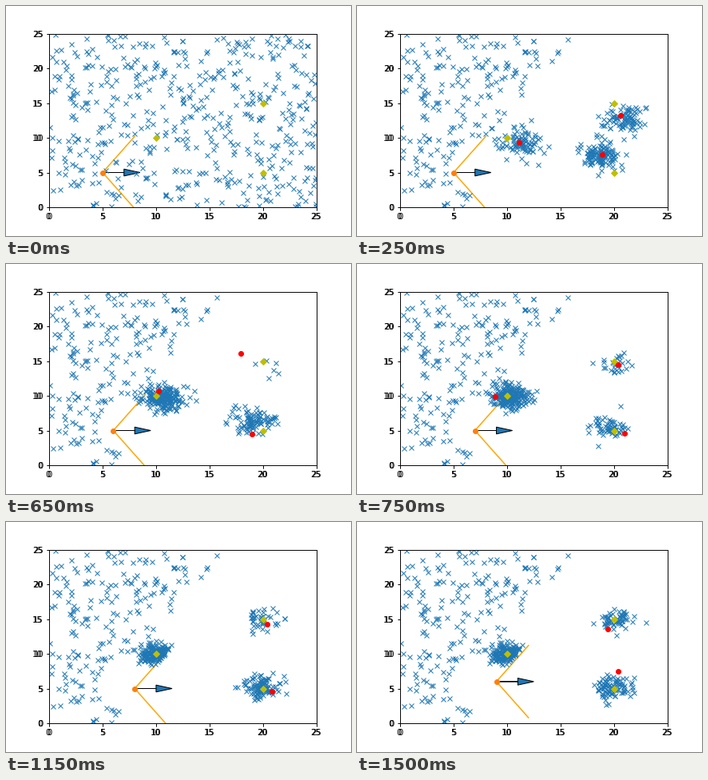
A matplotlib script that plays this animation: 432 px wide and 288 px high, repeating every 1750 ms.

```python
import numpy as np
import matplotlib.pyplot as plt
from matplotlib.animation import FuncAnimation
from matplotlib.transforms import ScaledTranslation

SIZE = 25
STEPS = 7
FOV = np.pi / 3
REACH = 6
LOST = 4  # step at which the first landmark leaves the view
BOX = [0.125, 0.125, 0.775, 0.755]
LANDMARKS = np.array([(10, 10), (20, 15), (20, 5)])
# Where each cluster first forms, relative to its landmark.
OFFSETS = np.array([(1.3, -0.6), (0.8, -2.3), (-1.4, 2.4)])
# Particles per landmark at each step after the first.
COUNTS = [(90, 90, 120), (200, 6, 95), (215, 26, 60),
          (215, 40, 110), (215, 32, 115), (215, 60, 95)]
SIGHTINGS = [
    [],
    [(11.1, 9.3), (18.9, 7.6), (20.6, 13.2)],
    [(10.2, 10.7), (19, 4.5), (17.9, 16.1)],
    [(8.9, 9.9), (21, 4.6), (20.4, 14.5)],
    [(20.8, 4.6), (20.4, 14.2)],
    [(20.5, 4.5), (19.3, 15.7)],
    [(20.4, 7.5), (19.4, 13.6)],
]


def pose(i):
    """Wait one step, drive right for four, then move up."""
    return np.array([5 + np.clip(i - 1, 0, 4), 5 + (i == STEPS - 1)])


def unseen(points, eye):
    dx, dy = (points - eye).T
    return np.abs(np.arctan2(dy, dx)) > FOV


def cluster(k, i):
    """Particles around landmark k, closing in on it step by step."""
    if k == 0:
        i = min(i, LOST)
    rng = np.random.default_rng([k, i])
    decay = 0.5 ** (i - 1)
    centre = LANDMARKS[k] + OFFSETS[k] * decay
    points = rng.normal(centre, 0.8 + 0.25 * decay, (COUNTS[i - 1][k], 2))
    if k == 0 and i == LOST:
        points = points[unseen(points, pose(i))]
    return points


field = np.random.default_rng(4).uniform(0, SIZE, (500, 2))
still = field[unseen(field, pose(0))]


def swarm(i):
    if i == 0:
        return field
    return np.vstack([still] + [cluster(k, i) for k in range(3)])


plt.rcParams.update({"font.family": "DejaVu Sans", "font.size": 10})
fig = plt.figure(figsize=(6, 4), dpi=72, facecolor="white")


def make_axes(**kw):
    ax = fig.add_axes(BOX, xlim=(0, SIZE), ylim=(0, SIZE), **kw)
    ax.set_xticks(range(0, SIZE + 1, 5))
    ax.set_yticks(range(0, SIZE + 1, 5))
    return ax


# A second set of labels, one pixel to the left, doubles the digits.
back = make_axes(label="back")
shift = ScaledTranslation(-1 / 72, 0, fig.dpi_scale_trans)
for text in back.get_xticklabels() + back.get_yticklabels():
    text.set_transform(text.get_transform() + shift)
ax = make_axes(label="front", facecolor="none")

arrow = ax.arrow(5, 5, 2, 0, head_width=1, head_length=1.5,
                 fc="C0", ec="black")
rays = [ax.plot([], [], color="orange")[0] for _ in range(2)]
particles, = ax.plot([], [], "x", color="C0")
robot, = ax.plot([], [], "o", color="C1")
ax.plot(*LANDMARKS.T, "yD")
seen, = ax.plot([], [], "ro")


def update(i):
    x, y = pose(i)
    particles.set_data(*swarm(i).T)
    seen.set_data(*np.reshape(SIGHTINGS[i], (-1, 2)).T)
    robot.set_data([x], [y])
    arrow.set_data(x=x, y=y)
    for ray, a in zip(rays, (FOV, -FOV)):
        ray.set_data([x, x + REACH * np.cos(a)], [y, y + REACH * np.sin(a)])
    return [arrow, *rays, particles, robot, seen]


anim = FuncAnimation(fig, update, frames=STEPS, interval=250, repeat=True)
plt.show()
```
